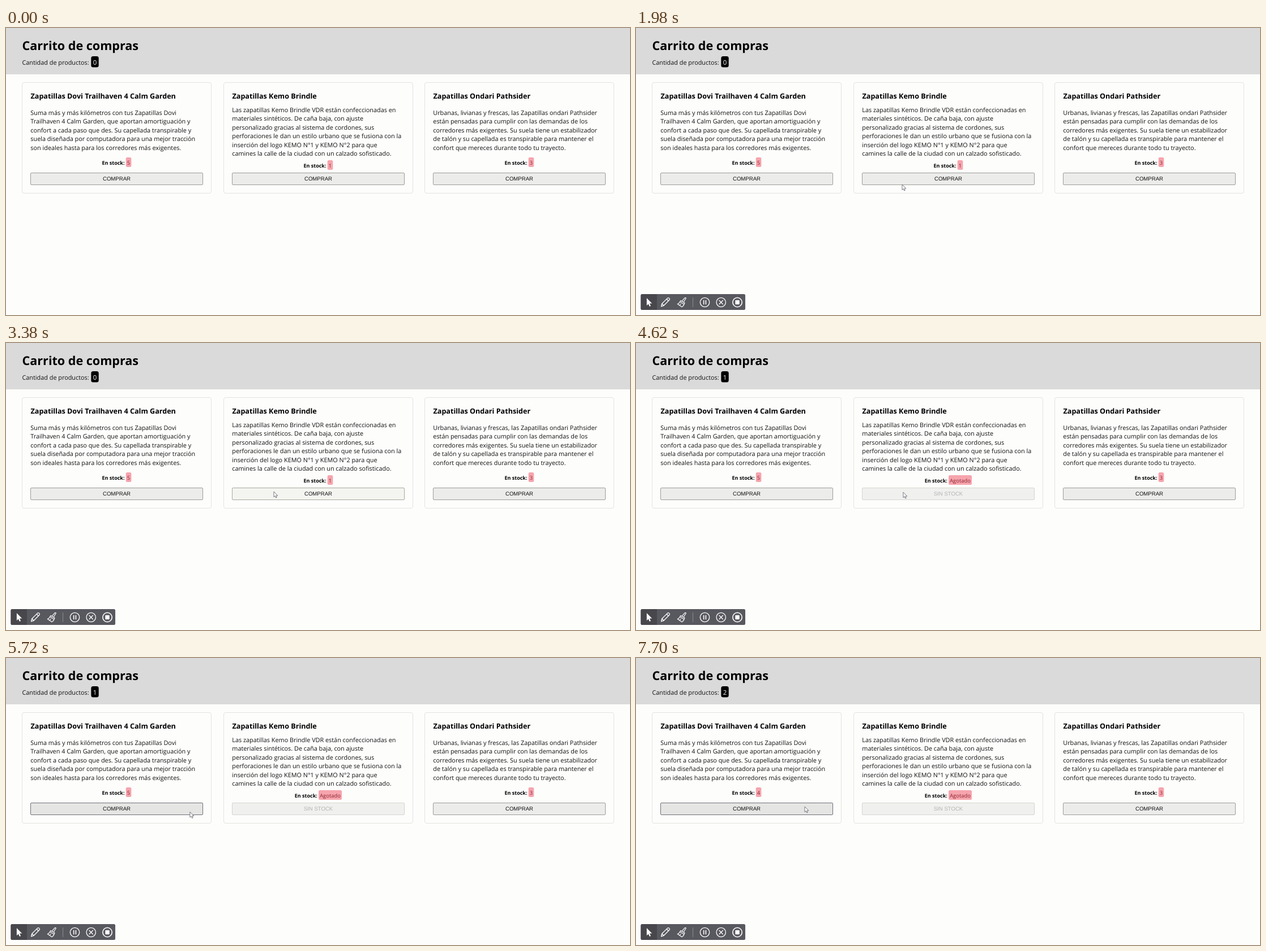
An HTML page for the animation above (8 s loop, 1102 by 508 pixels).

```html
<!DOCTYPE html>
<html lang="es">
<head>
<meta charset="utf-8">
<title>Carrito de compras</title>
<style>
  html, body { margin: 0; width: 100%; height: 100%; overflow: hidden; background: #fdfdfc; }
  svg { display: block; width: 100vw; height: 100vh; }
  text { font-family: "Open Sans", "Noto Sans", sans-serif; font-size: 10.85px; fill: #111; text-rendering: geometricPrecision; }
  .heading { font-size: 21.55px; font-weight: 700; fill: #000; }
  .title { font-size: 12.58px; font-weight: 700; fill: #000; }
  .label { font-size: 9px; font-weight: 700; fill: #000; text-anchor: end; }
  .stock { font-size: 9.4px; fill: #8c2531; text-anchor: middle; }
  .count { font-size: 11.3px; fill: #fff; text-anchor: middle; }
  .action { font-family: "Liberation Sans", Arial, sans-serif; font-size: 9.6px; text-anchor: middle; }
  .icon { fill: none; stroke: #fff; stroke-width: 1.3; stroke-linejoin: round; stroke-linecap: round; }
  .solid { fill: #fff; stroke: none; }
</style>
</head>
<body>
<svg id="stage" viewBox="0 0 1102 508" xmlns="http://www.w3.org/2000/svg">
  <rect width="1102" height="508" fill="#fdfdfc"/>
  <rect width="1102" height="82" fill="#dadada"/>
  <text class="heading" x="28.6" y="38.8">Carrito de compras</text>
  <text x="28.5" y="65">Cantidad de productos:</text>
  <rect x="150.3" y="50" width="13.4" height="19.5" rx="3.5"/>
  <text class="count" id="count" x="157" y="65">0</text>
  <g id="cards"></g>
  <g id="toolbar">
    <rect x="8.5" y="471" width="184.5" height="28" rx="2.5" fill="#58585f"/>
    <path d="M37 471H11a2.5 2.5 0 0 0-2.5 2.5V496.5a2.5 2.5 0 0 0 2.5 2.5H37Z" fill="#47474c"/>
    <path class="solid" d="M18.9 478V491.2L21.9 488.5 23.9 493 26 492 24 487.6H28.3Z"/>
    <g class="icon">
      <path d="M44.5 492.8L45.8 488 55.7 478.1Q57.2 476.9 58.7 478.4T59 481.3L49.1 491.3ZM54 479.8L57.3 483M45.8 488L49.1 491.3"/>
      <path d="M81.2 483.3L86.2 477.7Q87.7 476.7 88.3 478.2L84 485.2M78.8 482.6L86 486.8 84.9 489 77.5 484.7ZM77.5 484.7Q76 487.5 73.3 488.6L81 493.8Q84 492.5 84.9 489M77 491L79 488.5" stroke-width="1.2"/>
      <path d="M100.5 477.5V493.5" stroke="#8b8b91" stroke-width="1"/>
      <circle cx="121.5" cy="485.5" r="8.2"/>
      <path d="M119.6 482.3V488.7M123.4 482.3V488.7" stroke-width="1.6"/>
      <circle cx="150.2" cy="485.5" r="8.2"/>
      <path d="M147 482.3L153.4 488.7M153.4 482.3L147 488.7"/>
      <circle cx="179" cy="485.5" r="8.2" stroke-width="1.6"/>
      <rect class="solid" x="175.3" y="481.8" width="7.4" height="7.4" rx="1"/>
    </g>
  </g>
  <path id="cursor" d="M0 0V9.6L2.2 7.7 3.7 11 5.2 10.3 3.8 7.1H6.8Z" fill="#fff" stroke="#6a6a74" stroke-width=".9" stroke-linejoin="round"/>
</svg>
<script>
const LOOP = 8000;
const COLUMN = 355.5;
const BUTTON = { x: 43.5, y: 256.5, width: 304, height: 21 };
const BUTTON_CENTER = BUTTON.x + BUTTON.width / 2;
const FIRST_CLICK = { down: 3380, up: 3780 };
const SECOND_CLICK = { down: 7400, up: 7700 };

const products = [
  { title: "Zapatillas Dovi Trailhaven 4 Calm Garden", top: 153.8, stockY: 242, lines: [
    "Suma más y más kilómetros con tus Zapatillas Dovi",
    "Trailhaven 4 Calm Garden, que aportan amortiguación y",
    "confort a cada paso que des. Su capellada transpirable y",
    "suela diseñada por computadora para una mejor tracción",
    "son ideales hasta para los corredores más exigentes."] },
  { title: "Zapatillas Kemo Brindle", top: 148.8, stockY: 247, lines: [
    "Las zapatillas Kemo Brindle VDR están confeccionadas en",
    "materiales sintéticos. De caña baja, con ajuste",
    "personalizado gracias al sistema de cordones, sus",
    "perforaciones le dan un estilo urbano que se fusiona con la",
    "inserción del logo KEMO N°1 y KEMO N°2 para que",
    "camines la calle de la ciudad con un calzado sofisticado."] },
  { title: "Zapatillas Ondari Pathsider", top: 153.8, stockY: 242, lines: [
    "Urbanas, livianas y frescas, las Zapatillas ondari Pathsider",
    "están pensadas para cumplir con las demandas de los",
    "corredores más exigentes. Su suela tiene un estabilizador",
    "de talón y su capellada es transpirable para mantener el",
    "confort que mereces durante todo tu trayecto."] }
];

const buttonStyles = {
  normal: { fill: "#ececeb", stroke: "#9c9c95", text: "#111" },
  hover: { fill: "#e5e5e4", stroke: "#707078", text: "#111" },
  active: { fill: "#f4f4f1", stroke: "#a9a99e", text: "#111" },
  disabled: { fill: "#f0f0ef", stroke: "#d6d6cd", text: "#b3b3b3" }
};

// time, x, y of the pointer tip
const pointerPath = [
  [1260, 436, 510], [1500, 448, 400], [1760, 464, 305], [1980, 470, 277],
  [2060, 470, 277], [2240, 473, 264], [2400, 473, 263],
  [4600, 473, 263], [4800, 463, 273], [5020, 451, 284], [5340, 428, 287],
  [5420, 428, 287], [5560, 383, 282], [5720, 325, 272.5], [5920, 307, 268],
  [6180, 300, 265], [6300, 300, 265], [6440, 298, 263]
];

const stage = document.getElementById("stage");
const find = id => document.getElementById(id);
const columnX = index => Math.round(index * COLUMN);

function add(parent, tag, attributes, content = "") {
  const node = document.createElementNS(stage.namespaceURI, tag);
  setAll(node, attributes);
  node.textContent = content;
  return parent.appendChild(node);
}

function setAll(node, attributes) {
  for (const [name, value] of Object.entries(attributes)) node.setAttribute(name, value);
}

function buildCard({ title, top, stockY, lines }, index) {
  const group = add(find("cards"), "g", { transform: `translate(${columnX(index)} 0)` });
  add(group, "rect", { x: 28.5, y: 96.5, width: 334, height: 196, rx: 3.5, fill: "#fdfdfc", stroke: "#e3e3df" });
  add(group, "text", { class: "title", x: 43.5, y: 125.2 }, title);
  lines.forEach((line, row) => add(group, "text", { x: 43.3, y: top + row * 15.5 }, line));
  return {
    label: add(group, "text", { class: "label", y: stockY }, "En stock:"),
    pill: add(group, "rect", { y: stockY - 13, height: 17, rx: 2.5, fill: "#f6a4ad" }),
    stock: add(group, "text", { class: "stock", y: stockY }),
    button: add(group, "rect", { ...BUTTON, rx: 1.5 }),
    action: add(group, "text", { class: "action", x: BUTTON_CENTER, y: 270 })
  };
}

const cards = products.map(buildCard);

function pointerAt(time) {
  const next = pointerPath.findIndex(point => point[0] > time);
  if (next < 0) return pointerPath.at(-1).slice(1);
  if (next === 0) return null;
  const [t0, x0, y0] = pointerPath[next - 1];
  const [t1, x1, y1] = pointerPath[next];
  const k = (time - t0) / (t1 - t0);
  return [x0 + (x1 - x0) * k, y0 + (y1 - y0) * k];
}

function isOver(pointer, index) {
  if (!pointer) return false;
  const x = pointer[0] - columnX(index) - BUTTON.x;
  const y = pointer[1] - BUTTON.y;
  return x > 0 && x < BUTTON.width && y > 0 && y < BUTTON.height - 1;
}

function drawCard(card, stock, state) {
  const soldOut = stock === 0;
  const pillWidth = soldOut ? 41 : 9.6;
  const pillCenter = BUTTON_CENTER + 21;
  const pillX = pillCenter - pillWidth / 2;
  const style = buttonStyles[soldOut ? "disabled" : state];
  setAll(card.label, { x: pillX - 2.2 });
  setAll(card.pill, { x: pillX, width: pillWidth });
  setAll(card.stock, { x: pillCenter });
  card.stock.textContent = soldOut ? "Agotado" : stock;
  setAll(card.button, { fill: style.fill, stroke: style.stroke });
  card.action.textContent = soldOut ? "SIN STOCK" : "COMPRAR";
  card.action.style.fill = style.text;
}

function render(time) {
  const pointer = pointerAt(time);
  const bought = [time >= SECOND_CLICK.up, time >= FIRST_CLICK.up, false].map(Number);
  const pressed = [FIRST_CLICK, SECOND_CLICK].some(({ down, up }) => time >= down && time < up);
  [5, 1, 3].forEach((stock, index) => {
    const state = !isOver(pointer, index) ? "normal" : pressed ? "active" : "hover";
    drawCard(cards[index], stock - bought[index], state);
  });
  find("count").textContent = bought[0] + bought[1];
  find("toolbar").style.opacity = time < 140 ? 0 : time < 160 ? 0.6 : 1;
  find("cursor").style.display = pointer ? "" : "none";
  if (pointer) setAll(find("cursor"), { transform: `translate(${pointer.join(" ")})` });
}

const start = performance.now();
function tick() {
  render((performance.now() - start) % LOOP);
  requestAnimationFrame(tick);
}
tick();
</script>
</body>
</html>
```
